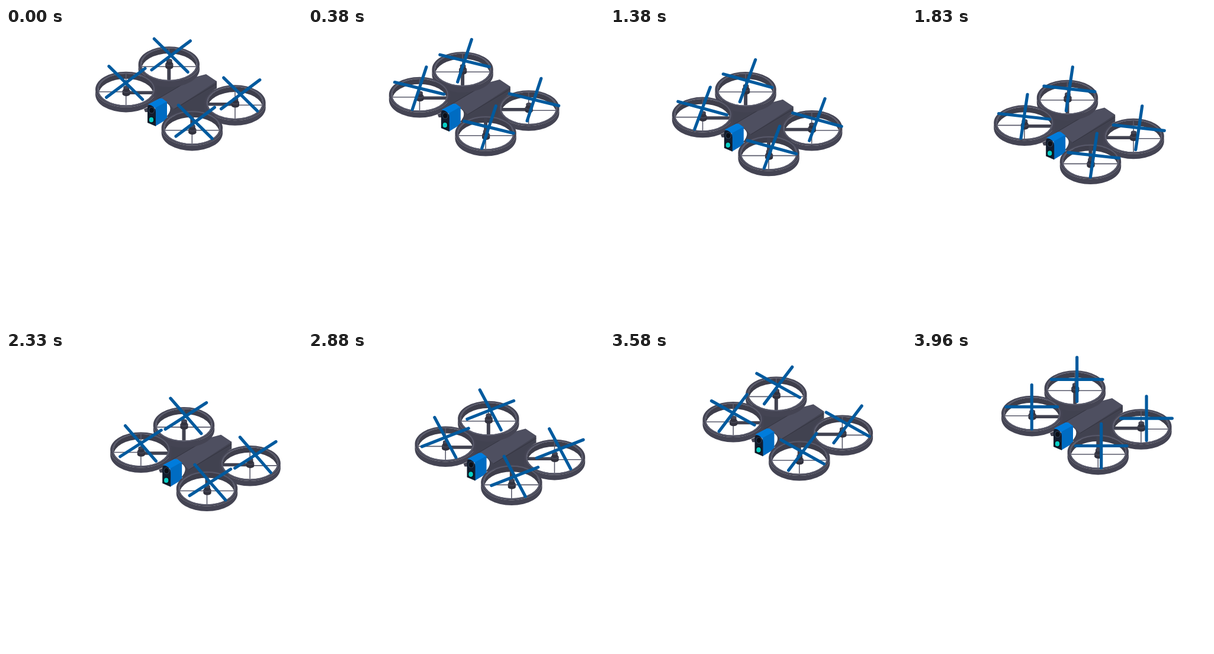
Write an HTML page with a canvas that moves like this. It is 500 px wide and 500 px high and loops after 4000 ms.

```html
<!DOCTYPE html>
<html lang="en">
<head>
<meta charset="utf-8">
<title>Drone</title>
<style>
html, body { margin: 0; width: 100%; height: 100%; overflow: hidden; background: #fff; }
canvas { display: block; width: 500px; height: 500px; }
</style>
</head>
<body>
<canvas id="stage" width="500" height="500"></canvas>
<script>
const ctx = document.getElementById('stage').getContext('2d');
const LOOP = 4000, FPS = 24;
const C = {
  plate: '#414250', slab: '#4e4f60', line: '#343440',
  rim: '#595a6b', wall: '#444453', inner: '#3e3e4b', hub: '#32323e',
  blade: '#005a9e', blue: '#006cc2', top: '#007cdc', face: '#121c2c'
};

// Smooth step from 0 to 1 between two times
function ease(t, from, to) {
  const u = Math.min(1, Math.max(0, (t - from) / (to - from)));
  return u * u * (3 - 2 * u);
}

const hoverX = t => -51 * ease(t, 0, 1080) + 82 * ease(t, 1170, 2560) - 31 * ease(t, 2720, 3900);
const hoverY = t => 40 * ease(t, 0, 1220) + 21.7 * ease(t, 1150, 2150) - 61.7 * ease(t, 2500, 3960);

// Four corners of the airframe: a runs tail to nose, b left to right
const ringX = (a, b) => 294.8 + 36.3 * a + 55.8 * b;
const ringY = (a, b) => 115 - 21.3 * a + 32.5 * b;
const propX = (a, b) => 299.2 + 38.2 * a + 58.7 * b;
const propY = (a, b) => 102.4 - 23.2 * a + 32.9 * b;

function fill(color, rule) {
  ctx.fillStyle = color;
  ctx.fill(rule || 'nonzero');
}

function poly(color, ...p) {
  ctx.beginPath();
  for (let i = 0; i < p.length; i += 2) ctx.lineTo(p[i], p[i + 1]);
  fill(color);
}

function line(color, width, x1, y1, x2, y2) {
  ctx.beginPath();
  ctx.moveTo(x1, y1);
  ctx.lineTo(x2, y2);
  ctx.strokeStyle = color;
  ctx.lineWidth = width;
  ctx.stroke();
}

function oval(x, y, rx, ry) {
  ctx.moveTo(x + rx, y);
  ctx.ellipse(x, y, rx, ry, 0, 0, Math.PI * 2);
}

function disc(color, x, y, rx, ry) {
  ctx.beginPath();
  oval(x, y, rx, ry);
  fill(color);
}

function cylinder(x, y, rx, h) {
  const ry = rx * 0.58;
  disc(C.hub, x, y + h, rx, ry);
  ctx.fillRect(x - rx, y, rx * 2, h);
  disc(C.wall, x, y, rx, ry);
}

function ring(a, b) {
  const x = ringX(a, b), y = ringY(a, b);
  const RX = 51.7, RY = 30, IX = 46.3, IY = 26.7, H = 8.6;
  const hubY = y - 1.5 * a;

  // Far inner wall, spokes and arm, seen through the opening
  ctx.save();
  ctx.beginPath();
  oval(x, y, IX, IY);
  ctx.clip();
  ctx.beginPath();
  ctx.rect(x - 60, y - 40, 120, 90);
  oval(x, y + H, IX, IY);
  fill(C.inner, 'evenodd');
  line(C.rim, 1.6, x - IX, y + 4, x + IX, y + 4);
  line(C.rim, 1.6, x, y - IY, x, y + IY);
  if (a === b) line(C.plate, 5.5, x, hubY + 4, x - a * 60, hubY + 4);
  else line(C.plate, 6, x, hubY + 4, x, hubY + a * 40);
  ctx.restore();

  // Near outer wall
  ctx.beginPath();
  ctx.ellipse(x, y, RX, RY, 0, Math.PI, 0, true);
  ctx.ellipse(x, y + H, RX, RY, 0, 0, Math.PI);
  fill(C.wall);

  // Rim
  ctx.beginPath();
  oval(x, y, RX, RY);
  oval(x, y, IX, IY);
  fill(C.wall, 'evenodd');
  ctx.beginPath();
  oval(x, y, IX + 1.2, IY + 1);
  ctx.strokeStyle = C.rim;
  ctx.lineWidth = 1.8;
  ctx.stroke();

  cylinder(x + 0.5, hubY + 1, 6.6, 5);
  cylinder(x + 0.5, hubY - 5, 4.8, 5);
}

function body() {
  // Cross plate with hollow sides that follow the rings
  ctx.beginPath();
  ctx.moveTo(234, 78);
  ctx.quadraticCurveTo(268, 97, 319, 83);
  ctx.lineTo(356, 90);
  ctx.lineTo(356, 102);
  ctx.quadraticCurveTo(324, 118, 352, 149);
  ctx.quadraticCurveTo(318, 140, 270, 151);
  ctx.quadraticCurveTo(285, 134, 270, 126);
  ctx.lineTo(246, 126);
  ctx.quadraticCurveTo(258, 110, 234, 78);
  fill(C.plate);

  poly(C.slab, 256, 120, 319, 83, 338, 78, 356, 90, 284, 137, 271, 125);
  line(C.line, 1, 256, 120, 319, 83);
  line(C.line, 1, 284, 137, 356, 94);
}

function camera() {
  poly(C.wall, 233, 137, 240, 134, 240, 142, 235, 142);
  poly(C.top, 240, 129, 259, 119, 264, 119, 272, 125, 253, 136);
  poly(C.blue, 252, 135, 272, 124, 272, 154, 252, 166);
  ctx.beginPath();
  ctx.moveTo(239, 160);
  ctx.lineTo(239, 134);
  ctx.quadraticCurveTo(240, 128, 246, 131);
  ctx.quadraticCurveTo(253, 135, 253, 142);
  ctx.lineTo(253, 166);
  fill(C.face);
  disc('#34445a', 246, 139, 4.8, 5.5);
  disc('#0b0f17', 246, 139, 3.9, 4.6);
  disc('#0b0f17', 246, 155, 5, 5.6);
  disc('#08cfc6', 245.5, 155, 3.7, 4.3);
}

function prop(a, b, angle) {
  const x = propX(a, b), y = propY(a, b);
  ctx.lineCap = 'round';
  for (const turn of [angle, angle + Math.PI / 2]) {
    const dx = Math.sin(turn) * 43.3, dy = Math.cos(turn) * 37.2;
    line(C.blade, 5.2, x - dx, y + dy, x + dx, y - dy);
  }
  ctx.lineCap = 'butt';
}

function draw(ms) {
  const n = Math.floor((ms % LOOP + 4.9) * FPS / 1000) % (LOOP * FPS / 1000);
  const t = n * 1000 / FPS;
  const angle = (48.9 + n * 56.327) * Math.PI / 180;

  ctx.clearRect(0, 0, 500, 500);
  ctx.save();
  ctx.translate(hoverX(t), hoverY(t));
  body();
  ring(1, -1);
  ring(-1, -1);
  ring(1, 1);
  camera();
  ring(-1, 1);
  for (const a of [1, -1]) for (const b of [-1, 1]) prop(a, b, angle);
  ctx.restore();
}

const start = performance.now();
function tick() {
  draw(performance.now() - start);
  requestAnimationFrame(tick);
}
tick();
</script>
</body>
</html>
```
